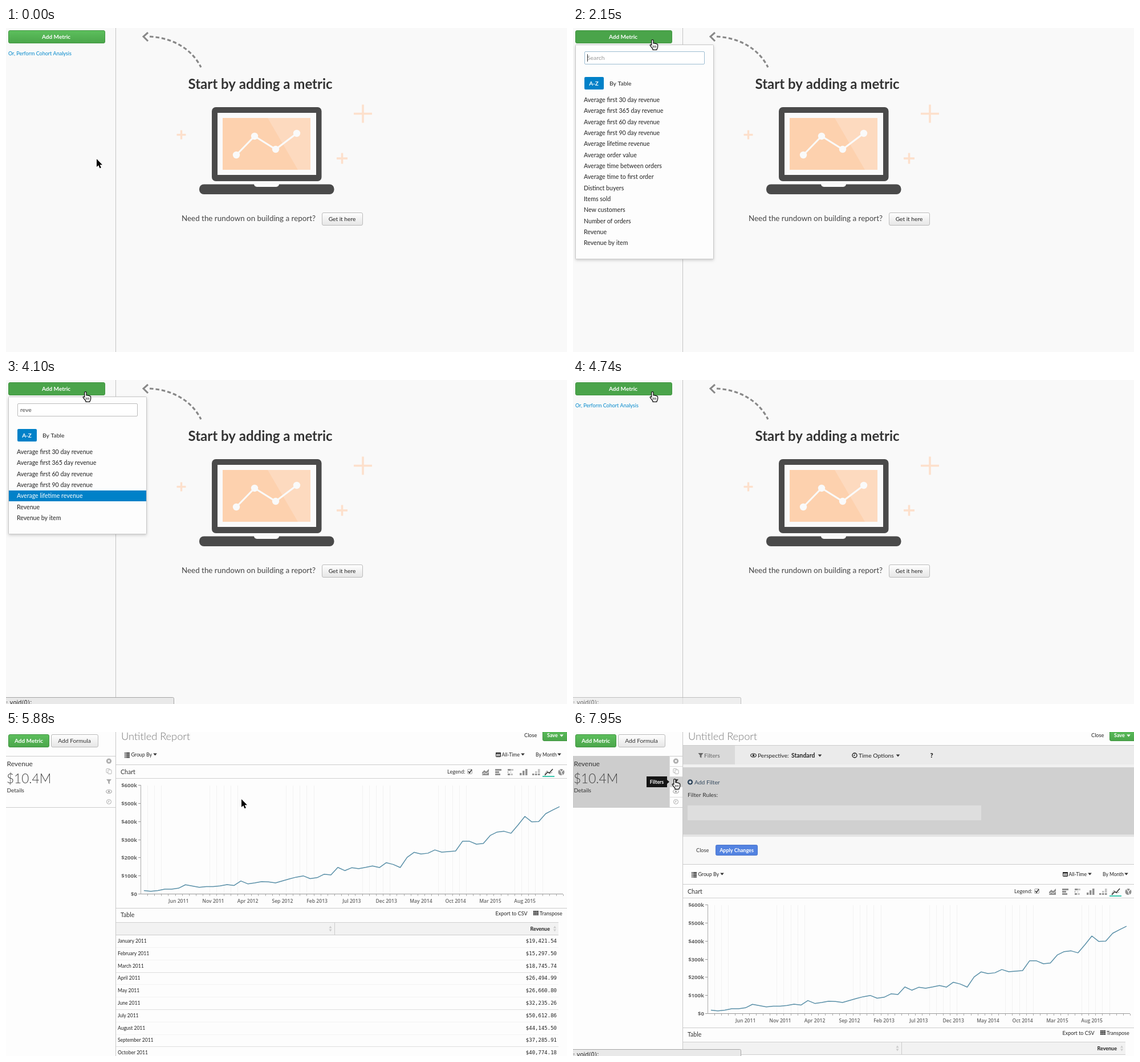
Recreate the animation shown at these times as an HTML page with a canvas. Size 984 px wide and 569 px high, loop 8000 ms.

```html
<!DOCTYPE html>
<html lang="en">
<head>
<meta charset="utf-8">
<title>Report builder</title>
<style>
html, body { margin: 0; width: 100%; height: 100%; overflow: hidden; background: #f9f9f9; }
canvas { display: block; }
</style>
</head>
<body>
<canvas id="stage" width="984" height="569"></canvas>
<script>
const c = document.getElementById('stage').getContext('2d');
const LOOP = 8000;
const SANS = 'Lato, sans-serif', AXIS = '"Open Sans", sans-serif', MONO = '"DejaVu Sans Mono", monospace';

const METRICS = ['Average first 30 day revenue', 'Average first 365 day revenue', 'Average first 60 day revenue',
  'Average first 90 day revenue', 'Average lifetime revenue', 'Average order value', 'Average time between orders',
  'Average time to first order', 'Distinct buyers', 'Items sold', 'New customers', 'Number of orders',
  'Revenue', 'Revenue by item'];
const ROWS = [['January', '19,421.54'], ['February', '15,297.50'], ['March', '18,745.74'], ['April', '26,494.99'],
  ['May', '26,660.80'], ['June', '32,235.26'], ['July', '50,612.86'], ['August', '44,145.50'],
  ['September', '37,285.91'], ['October', '40,774.18']];
// monthly revenue in thousands
const SALES = [19, 15, 19, 26.5, 26.7, 32, 51, 44, 37, 41, 40.5, 45, 52, 47, 72, 56, 61, 68, 67, 61, 72, 83, 93, 100,
  85, 90, 109, 105, 147, 129, 145, 140, 147, 155, 146, 173, 163, 146, 202, 230, 221, 225, 243, 231, 234, 237, 291,
  291, 275, 279, 323, 342, 346, 335, 380, 428, 398, 400, 443, 463, 482];
const LABELS = ['Jun 2011', 'Nov 2011', 'Apr 2012', 'Sep 2012', 'Feb 2013', 'Jul 2013', 'Dec 2013', 'May 2014',
  'Oct 2014', 'Mar 2015', 'Aug 2015'];
// pointer: time, x, y, is a hand
const POINTER = [[0, 159, 230], [480, 159, 229], [660, 157, 208], [744, 148, 155], [828, 132, 98], [912, 119, 60],
  [996, 113, 38], [1080, 134, 20, 1], [5220, 149, 27, 1], [5340, 150, 36, 1], [5520, 260, 75], [5640, 380, 110],
  [5880, 413, 118], [6000, 584, 91], [6140, 690, 95], [6620, 650, 97], [6705, 605, 102], [6790, 558, 108],
  [6970, 420, 98], [7070, 270, 68], [7210, 172, 46, 1], [7330, 167, 75, 1], [7450, 171, 80, 1], [7600, 173, 82, 1]];

const HAND = new Path2D('M3.5 9.5V2a1.5 1.5 0 0 1 3 0v4.5q1.5-1 2.5.4q1.6-.8 2.4.6q2-.4 2.1 1.5v3.5q-.3 2-1.5 3.5v1h-6.5v-1.5q-2.5-3-4.3-5.6q-.6-2.2 2.3-.9z');
const ARROW = new Path2D('M0 0V14l3.2-3 2.3 5.2 2.4-1-2.3-5H10z');

function text(s, x, y, size, color = '#333', weight = 400, align = 'left', family = SANS) {
  c.font = `${weight} ${size}px ${family}`;
  c.textAlign = align;
  c.fillStyle = color;
  c.fillText(s, x, y);
}
function rect(x, y, w, h, fill) { c.fillStyle = fill; c.fillRect(x, y, w, h); }
function box(x, y, w, h, r, fill, stroke) {
  c.beginPath();
  c.roundRect(x, y, w, h, r);
  if (fill) { c.fillStyle = fill; c.fill(); }
  if (stroke) { c.strokeStyle = stroke; c.lineWidth = 1; c.stroke(); }
}
function line(points, color, width = 1) {
  c.beginPath();
  points.forEach(p => c.lineTo(...p));
  c.strokeStyle = color;
  c.lineWidth = width;
  c.stroke();
}
function poly(points, fill) {
  c.beginPath();
  points.forEach(p => c.lineTo(...p));
  c.fillStyle = fill;
  c.fill();
}
function dot(x, y, r, fill) { c.beginPath(); c.arc(x, y, r, 0, 7); c.fillStyle = fill; c.fill(); }
function ring(x, y, r, color, width = 1) {
  c.beginPath(); c.arc(x, y, r, 0, 7);
  c.strokeStyle = color; c.lineWidth = width; c.stroke();
}
const hline = (x1, x2, y, color) => rect(x1, y, x2 - x1, 1, color);
const vline = (x, y1, y2, color) => rect(x, y1, 1, y2 - y1, color);
const caret = (x, y, color = '#333') => poly([[x - 3.3, y - 2], [x + 3.3, y - 2], [x, y + 2]], color);
function faded(alpha, draw) { c.save(); c.globalAlpha = alpha; draw(); c.restore(); }
function shade(y, h, top, bottom) {
  const g = c.createLinearGradient(0, y, 0, y + h);
  g.addColorStop(0, top);
  g.addColorStop(1, bottom);
  return g;
}

const green = (x, y, w, h, flat) =>
  box(x + .5, y + .5, w - 1, h - 1, 2.5, flat ? '#4aa44a' : shade(y, h, '#5dc05d', '#4aa54a'), '#419641');
const gray = (x, y, w, h) => box(x + .5, y + .5, w - 1, h - 1, 2.5, shade(y, h, '#ffffff', '#e5e5e5'), '#bbb');

// icons
function eye(x, y, color) {
  c.beginPath(); c.ellipse(x, y, 4.8, 3, 0, 0, 7);
  c.strokeStyle = color; c.lineWidth = 1.2; c.stroke();
  dot(x, y, 1.8, color);
}
function clock(x, y, color, width = 1) {
  ring(x, y, 4, color, width);
  line([[x, y - 2.3], [x, y + .5], [x - 2, y + .5]], color);
}
const funnel = (x, y, color) =>
  poly([[x - 4.5, y - 4], [x + 4.5, y - 4], [x + 1.3, y], [x + 1.3, y + 4.5], [x - 1.3, y + 3], [x - 1.3, y]], color);
function cross(x, y, color) {
  dot(x, y, 4.6, color);
  line([[x - 1.7, y - 1.7], [x + 1.7, y + 1.7]], '#fff', 1.3);
  line([[x + 1.7, y - 1.7], [x - 1.7, y + 1.7]], '#fff', 1.3);
}
function copy(x, y, color) {
  box(x - 4.5, y - 4.5, 6, 7, 1, '#fff', color);
  box(x - 1.5, y - 2.5, 6, 7, 1, '#fff', color);
}

function plus(x, y, size, width) {
  const h = size / 2;
  line([[x - h, y], [x + h, y]], '#fde0cc', width);
  line([[x, y - h], [x, y + h]], '#fde0cc', width);
}

function startPage(hover) {
  rect(0, 0, 984, 569, '#f9f9f9');
  vline(192, 0, 569, '#c4c4c4');
  green(4, 4, 170, 23, hover);
  text('Add Metric', 88, 19, 10, '#fff', 700, 'center');
  text('Or, Perform Cohort Analysis', 4, 48, 9, '#0088cc');

  line([[249, 8], [241, 15], [249, 23]], '#888', 3);
  c.save();
  c.setLineDash([6.5, 4]);
  c.beginPath();
  c.moveTo(252, 15);
  c.bezierCurveTo(290, 17, 325, 35, 342, 69);
  c.strokeStyle = '#888';
  c.lineWidth = 3.2;
  c.stroke();
  c.restore();

  text('Start by adding a metric', 319.5, 107, 24, '#333', 700);
  box(361, 139, 192.5, 130, 7, '#4a4a4a');
  rect(371, 149, 173, 109, '#fafafa');
  rect(380, 158, 154, 91, '#fdd1ae');
  poly([[459, 158], [534, 158], [534, 249], [512, 249]], '#fddabf');
  const trend = [[404, 223], [436, 190], [473, 213], [510, 185]];
  line(trend, '#fafafa', 3.2);
  trend.forEach(([x, y]) => dot(x, y, 6.2, '#fafafa'));
  box(339, 274.5, 236.5, 17.5, 8, '#4a4a4a');
  box(435, 274, 44, 5, [0, 0, 5, 5], '#fafafa');
  plus(626, 150.5, 32, 3.6);
  plus(307.5, 187.5, 16, 3.4);
  plus(589.5, 229, 19, 3.6);
  text('Need the rundown on building a report?', 308, 339, 13.4, '#444');
  gray(554, 324, 72, 23);
  text('Get it here', 589.5, 339, 10.2, '#222', 400, 'center');
}

function dropdown(t) {
  const typed = 'reve'.slice(0, [2650, 2730, 2910, 3020].filter(s => t >= s).length);
  const items = METRICS.filter(m => m.toLowerCase().includes(typed));
  const browsing = t >= 3470;
  const picked = browsing ? [3580, 3690, 3800, 4100, 4300].filter(s => t >= s).length : -1;
  const pitch = 19.33, height = 125 + pitch * (items.length - 1);
  c.save();
  c.shadowColor = 'rgba(0,0,0,.2)';
  c.shadowBlur = 5;
  c.shadowOffsetY = 2;
  box(4.5, 29.5, 242, height, 1, '#fdfdfd');
  c.restore();
  box(4.5, 29.5, 242, height, 1, null, '#c8c8c8');
  box(20.5, 41.5, 210, 22, 1.5, '#fff', browsing ? '#bbb' : '#9dbdd2');
  text(typed || 'Search', 25, 55.5, 10.4, typed ? '#444' : '#999');
  if (!typed) vline(25, 46, 59, '#333');
  box(20, 86, 34, 22, 2, '#0081c8');
  text('A-Z', 36.5, 100.5, 10, '#fff', 700, 'center');
  text('By Table', 64, 100.5, 10.4, '#222');
  items.forEach((m, i) => {
    const y = 126.5 + i * pitch;
    if (i === picked) rect(5, Math.round(y - 9.5), 241, 19, '#0081c8');
    text(m, 19, y + 3.5, 10.6, i === picked ? '#fff' : '#222');
  });
}

function loader(x, y) { box(x + .5, y + .5, 38, 11.5, 1.5, '#f8caae', '#eea063'); }

function sidebar(t) {
  const ready = t >= 5880, settled = t >= 5340, active = t >= 7860;
  const removing = t >= 7210 && t < 7450, filtering = t >= 7450;
  vline(192, 0, 569, '#c8c8c8');
  green(4, 4, 72, 23);
  text('Add Metric', 40, 19, 10, '#fff', 700, 'center');
  gray(79, 4, 83, 23);
  text('Add Formula', 120, 19, 10.3, '#333', 400, 'center');
  if (active) rect(0, 42, 169, 91, '#cdcdcd');
  hline(0, 192, 42, '#ccc');
  hline(0, 192, 132, '#ccc');
  const x = settled ? 1.5 : 9.5;
  if (!settled) {
    rect(0, 43, 4, 89, '#f1f1f1');
    vline(4, 43, 132, '#ccc');
    for (let y = 81; y < 93; y += 4) rect(0, y, 2, 2, '#888');
  }
  text('Revenue', x, 60, 12, '#333');
  text('Details', x, 106, 10, '#333');
  if (ready) text('$10.4M', 1, 90, 22.6, '#444', 300);
  else loader(67, 75);
  if (!settled) return;

  if (active) {
    vline(169, 42, 132, '#ddd');
    for (let y = 60; y < 120; y += 18) hline(169, 192, y, '#ddd');
  }
  if (removing) rect(169, 43, 23, 17, '#f9bdbd');
  if (filtering) rect(169, 79, 23, 17, '#d0d0d0');
  cross(180.5, 51, removing ? '#333' : '#aaa');
  copy(180.5, 69, '#b5b5b5');
  funnel(180.5, 87, filtering ? '#333' : '#aaa');
  eye(180.5, 104.5, '#aaa');
  clock(180.5, 122.5, '#aaa');
  if (removing) tip('Remove', 120, 42, 43, '#4c4c4c');
  if (filtering) tip('Filters', 129, 78, 36, '#151515');
}

function tip(label, x, y, w, color) {
  rect(x, y, w, 19, color);
  poly([[x + w, y + 6], [x + w + 4, y + 9.5], [x + w, y + 13]], color);
  text(label, x + w / 2, y + 12.5, 8.8, '#fff', 700, 'center');
}

function toolbar() {
  text('Chart', 201, 73.5, 10.6);
  text('Legend:', 774, 73, 9.2);
  box(809.5, 65.5, 8, 8, 1.5, '#f4f4f4', '#aaa');
  line([[811, 69], [813, 72], [817, 66]], '#333', 1.4);
  const g = '#909090';
  poly([[835, 71], [839, 67], [842, 69.5], [847, 65], [847, 76], [835, 76]], g);
  line([[835, 74.5], [839, 71.5], [842, 73.5], [847, 70]], '#fdfdfd', 1);
  [11, 7, 9].forEach((w, i) => rect(858, 65 + i * 4, w, 3, g));
  [9, 5, 8].forEach((w, i) => { rect(880, 65 + i * 4, w - 4, 3, g); rect(885, 65 + i * 4, w - 4, 3, '#c4c4c4'); });
  [4, 8, 11].forEach((h, i) => rect(901 + i * 5, 76 - h, 3.5, h, g));
  [4, 7, 11].forEach((h, i) => { rect(923 + i * 5, 73, 3.5, 3, g); rect(923 + i * 5, 76 - h, 3.5, h - 4, '#c4c4c4'); });
  line([[945, 74], [949, 68], [953, 73], [958, 71]], '#888', 1);
  line([[945, 76], [950, 70.5], [953, 72], [959, 65]], '#222', 1.4);
  rect(941, 77, 21, 2, '#3cc8ae');
  dot(974, 70.5, 5.5, g);
  line([[971, 66], [974, 70.5], [978, 66]], '#fff', 1.2);
  line([[974, 70.5], [976, 76]], '#fff', 1.2);
  hline(193, 984, 81, '#d0d0d0');
}

function chart() {
  const left = 235.8, step = 12.15;
  const px = i => left + (i + .5) * step, py = k => 284.5 - k * 191 / 600;
  // ticks and grid lines stand between the months
  for (let i = 1; i <= SALES.length; i++) {
    const x = Math.round(left + i * step);
    if ((i + 1) % 11 < 5) vline(x, 94, 284, '#f2f2f2');
    vline(x, 285, 288, '#aaa');
  }
  hline(236, 977, 284, '#999');
  vline(236, 93, 285, '#aaa');
  for (let k = 0; k <= 600; k += 100) {
    hline(232, 236, Math.round(py(k) - .5), '#999');
    text(k ? `$${k}k` : '$0', 230, py(k) + 3.5, 9.6, '#666', 700, 'right', AXIS);
  }
  LABELS.forEach((s, i) => text(s, px(5 + i * 5), 299.5, 8.6, '#666', 600, 'center', AXIS));
  c.lineJoin = 'round';
  line(SALES.map((k, i) => [px(i), py(k)]), '#5a90a8', 1.5);
  c.lineJoin = 'miter';
}

function sorter(x) {
  poly([[x - 2.5, 344.5], [x + 2.5, 344.5], [x, 340.5]], '#ccc');
  poly([[x - 2.5, 346.5], [x + 2.5, 346.5], [x, 350.5]], '#ccc');
}

function table() {
  text('Export to CSV', 858.5, 322, 9, '#222');
  rect(193, 334, 776, 22, '#f2f2f2');
  hline(193, 969, 334, '#d0d0d0');
  hline(193, 969, 356, '#ccc');
  vline(576, 335, 356, '#ccc');
  sorter(569);
  sorter(962.5);
  text('Revenue', 954, 348.5, 9, '#222', 700, 'right');
  ROWS.forEach(([month, sum], i) => {
    const y = 370 + i * 21.8;
    text(month + ' 2011', 196, y, 8.5, '#222');
    text('$' + sum, 966, y, 9, '#222', 400, 'right', MONO);
    hline(193, 969, Math.round(y + 8), i % 3 === 2 ? '#dedede' : '#f3f3f3');
  });
}

function filterPanel() {
  rect(193, 23, 791, 210, '#f8f8f8');
  rect(193, 24, 791, 33, '#ebebeb');
  rect(193, 57, 791, 5, '#f1f1f1');
  rect(193, 24, 91, 33, '#dadada');
  rect(193, 62, 791, 118, '#d0d0d0');
  rect(193, 180, 791, 4, '#e4e4e4');
  hline(193, 984, 23, '#ccc');
  hline(193, 984, 232, '#ccc');
  funnel(224, 41, '#666');
  text('Filters', 230, 44.5, 10.2, '#666');
  eye(316.5, 41, '#222');
  text('Perspective:', 324, 44.5, 10.2, '#222');
  text('Standard', 383, 44.5, 10.4, '#222', 700);
  caret(433, 41.5);
  clock(494, 41, '#222', 1.4);
  text('Time Options', 501, 44.5, 10.4, '#222');
  caret(570, 41.5);
  text('?', 629, 45, 11, '#222', 900, 'center');
  dot(205.5, 88, 4.7, '#34495e');
  line([[203, 88], [208, 88]], '#fff', 1.4);
  line([[205.5, 85.5], [205.5, 90.5]], '#fff', 1.4);
  text('Add Filter', 213, 92, 10.3, '#34495e');
  text('Filter Rules:', 201, 114, 10.3);
  rect(201, 129, 515, 26, '#dedede');
  text('Close', 216, 211, 9.2);
  box(250.5, 198.5, 73, 18, 2, '#5383e1', '#4a74cb');
  text('Apply Changes', 287, 211, 9, '#fff', 700, 'center');
}

function report(t) {
  const drawn = t >= 5520, ready = t >= 5880;
  const drop = t < 7860 ? 0 : t < 7950 ? 120 : 210;
  rect(0, 0, 984, 569, '#fdfdfd');
  if (!ready) rect(0, 459, 984, 110, '#f9f9f9');
  text('Untitled Report', 202, 14, 18.2, '#777', 300);
  text('Close', 909, 8.5, 9.2, '#222');
  green(941, -6, 48, 22);
  text('Save', 949, 9, 9, '#fff', 700);
  caret(974.5, 6.5, '#fff');

  if (drop) {
    c.save();
    c.beginPath();
    c.rect(193, 23, 791, drop);
    c.clip();
    c.translate(0, drop - 210);
    filterPanel();
    c.restore();
  }
  c.save();
  c.translate(0, drop);
  for (let y = 36; y < 44; y += 2.6) { rect(208, y, 1.6, 1.6, '#222'); rect(210.5, y, 6.5, 1.6, '#222'); }
  text('Group By', 219.5, 43, 8.8, '#222');
  caret(261.5, 39.5);
  box(859.5, 36.5, 8, 7, .5, '#fff', '#222');
  rect(859, 36, 9, 2.5, '#222');
  for (let i = 0; i < 6; i++) rect(861 + i % 3 * 2.2, 39.6 + (i / 3 | 0) * 2, 1.3, 1.3, '#222');
  text('All-Time', 869.5, 43, 8.7, '#222');
  caret(906.5, 39.5);
  text('By Month', 929, 43, 8.5, '#222');
  caret(970.5, 39.5);
  hline(193, 984, 57, '#ccc');
  faded(t < 5340 ? .15 : 1, toolbar);
  if (drawn) chart();
  else { loader(570, 132); loader(570, 178); }
  hline(193, 984, 309, '#ccc');
  text('Table', 201, 325, 10.6);
  for (let i = 0; i < 9; i++) rect(925 + i % 3 * 3.2, 314 + (i / 3 | 0) * 2.8, 2.5, 2.2, '#222');
  text('Transpose', 936, 321.5, 9, '#222');
  if (ready) table();
  else loader(570, 446);
  c.restore();
  sidebar(t);
}

function statusBar(t) {
  let alpha = (t >= 3470 && t < 5000) || t >= 7210 ? 1 : 0;
  if (t >= 4740 && t < 5000) alpha = Math.max(0, 1 - (Math.floor((t - 4740) / 90) + 1) / 3);
  if (!alpha) return;
  faded(alpha, () => {
    box(-4.5, 557.5, 299, 20, 2, '#e9e9e9', '#a5a5a5');
    text(': void(0);', 0, 570, 10, '#222', 400, 'left', '"DejaVu Sans", sans-serif');
  });
}

function pointer(t) {
  const [, x, y, hand] = POINTER.findLast(p => t >= p[0]);
  c.save();
  c.translate(x, y);
  c.lineJoin = 'round';
  if (hand) {
    c.scale(1.08, 1.08);
    c.fillStyle = '#fff';
    c.fill(HAND);
    c.strokeStyle = '#111';
    c.lineWidth = 1.2;
    c.stroke(HAND);
    for (let i = 0; i < 3; i++) line([[6 + i * 2.2, 10], [6 + i * 2.2, 13.5]], '#222', .9);
  } else {
    c.strokeStyle = '#fff';
    c.lineWidth = 2;
    c.stroke(ARROW);
    c.fillStyle = '#000';
    c.fill(ARROW);
  }
  c.restore();
}

function draw(t) {
  if (t < 5220) startPage(t >= 1560);
  else report(t);
  if (t >= 2150 && t < 4480) dropdown(t);
  statusBar(t);
  pointer(t);
}

const began = performance.now();
function tick() {
  draw((performance.now() - began) % LOOP);
  requestAnimationFrame(tick);
}
tick();
</script>
</body>
</html>
```
